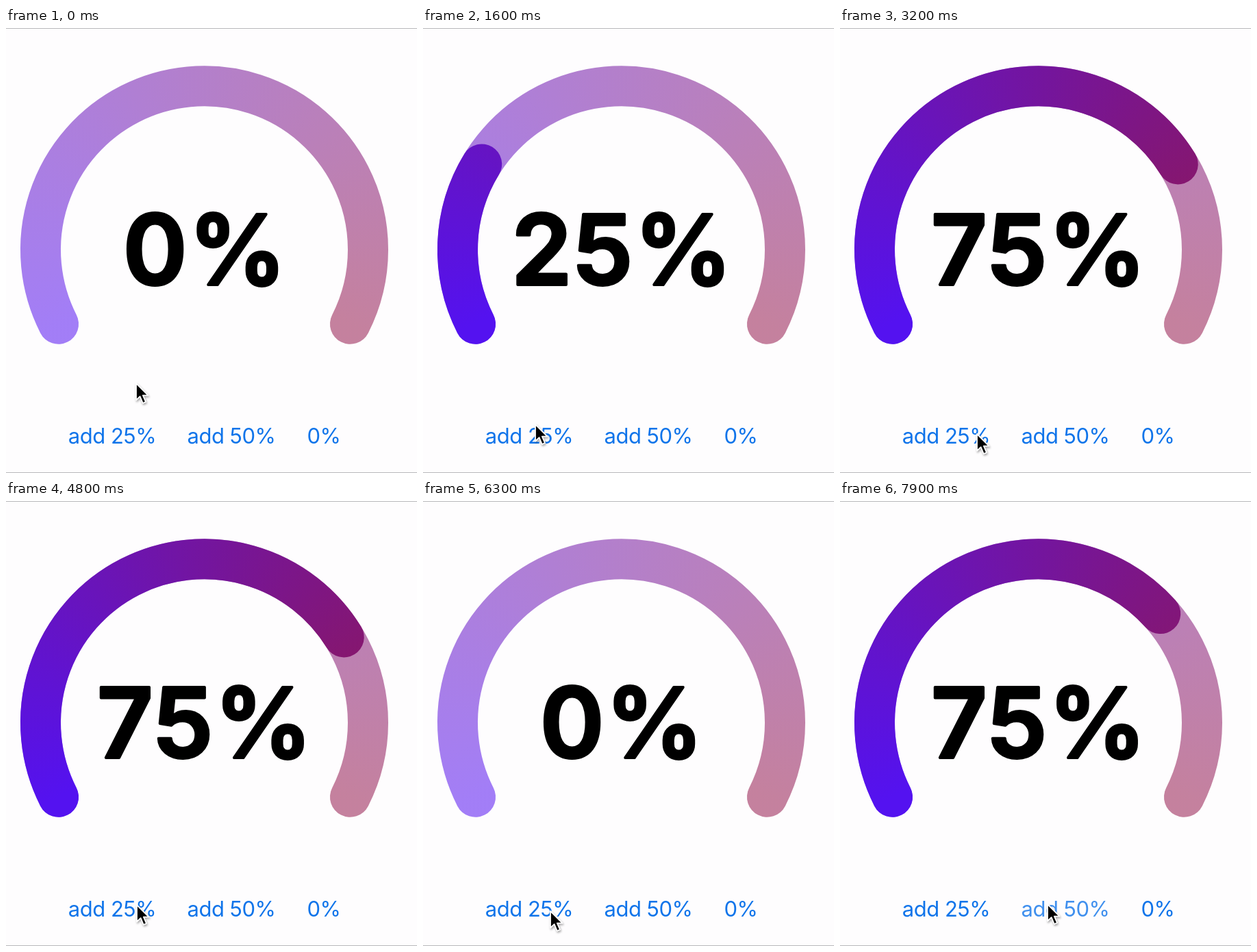
An HTML page with a canvas that plays this animation: 600 px wide and 650 px high, repeating every 8000 ms.

```html
<!DOCTYPE html>
<html lang="en">
<head>
<meta charset="utf-8">
<title>Gauge</title>
<style>
  html, body { margin: 0; width: 100%; height: 100%; overflow: hidden; background: #fefdfe; }
  canvas, svg { position: absolute; left: 0; top: 0; display: block; }
  text { font-family: Inter, "Open Sans", sans-serif; text-anchor: middle; }
  #value {
    font-size: 142px; font-weight: 600; letter-spacing: 2px;
    stroke: #000; stroke-width: 4; stroke-linejoin: round;
  }
  .button { font-size: 31px; letter-spacing: -0.5px; fill: #0f74ea; }
  #cursor { filter: drop-shadow(1px 2px 1.5px rgba(0, 0, 0, .35)); }
</style>
</head>
<body>
<canvas id="gauge" width="600" height="650"></canvas>
<svg width="600" height="650" viewBox="0 0 600 650">
  <path d="M0 .5H600M0 649.5H600" stroke="#b8b8bb"/>
  <text id="value" x="291" y="375"></text>
  <text class="button" x="155" y="607">add 25%</text>
  <text class="button" x="329" y="607">add 50%</text>
  <text class="button" x="464" y="607">0%</text>
  <path id="cursor" d="M0 0V24.5L5.6 19.2 9.8 29 14 27.2 9.9 17.7H17.5Z"
        fill="#000" stroke="#fff" stroke-width="1.8" stroke-linejoin="round"/>
</svg>
<script>
const LOOP = 8000;
const FILL_MS = 350;
const FADE_MS = 400;
const MOVE_MS = 300;
const START = 153 * Math.PI / 180;
const SWEEP = 234 * Math.PI / 180;
const CENTER = [289.5, 323.8];
const RADIUS = 239;

const [ADD_25, ADD_50, RESET] = document.querySelectorAll('.button');
const buttons = [ADD_25, ADD_50, RESET];

// where the pointer rests and when it gets there
const rests = [
  { at: 750, x: 164, y: 579 },
  { at: 2150, x: 300, y: 590 },
  { at: 3100, x: 200, y: 593 },
  { at: 4500, x: 191, y: 590 },
  { at: 5400, x: 456, y: 592 },
  { at: 6250, x: 186, y: 599 },
  { at: 6800, x: 303, y: 589 }
];

const clicks = [
  { at: 1000, button: ADD_25 },
  { at: 2250, button: ADD_50 },
  { at: 5500, button: RESET },
  { at: 6510, button: ADD_25 },
  { at: 7618, button: ADD_50 }
];

const ctx = document.getElementById('gauge').getContext('2d');
const valueText = document.getElementById('value');
const cursor = document.getElementById('cursor');

const clamp = v => Math.min(1, Math.max(0, v));
const ease = v => (1 - Math.cos(Math.PI * clamp(v))) / 2;
const mix = (a, b, k) => a + (b - a) * k;

const gradient = ctx.createConicGradient(Math.PI / 2, ...CENTER);
gradient.addColorStop(63 / 360, '#5412f0');
gradient.addColorStop(297 / 360, '#93184c');
ctx.strokeStyle = gradient;
ctx.lineWidth = 59;
ctx.lineCap = 'round';

function drawArc(fraction, alpha) {
  ctx.globalAlpha = alpha;
  ctx.beginPath();
  ctx.arc(...CENTER, RADIUS, START, START + SWEEP * fraction);
  ctx.stroke();
}

function gaugeAt(t) {
  let filled = 0, value = 0;
  for (const { at, button } of clicks) {
    if (t < at) break;
    const next = button === RESET ? 0 : value + parseInt(button.textContent.slice(4));
    filled = mix(value, next, ease((t - at) / FILL_MS));
    value = next;
  }
  return { filled, value };
}

function pointerAt(t) {
  let x = 190, y = 519;
  for (const rest of rests) {
    const k = ease((t - rest.at) / MOVE_MS + 1);
    x = mix(x, rest.x, k);
    y = mix(y, rest.y, k);
  }
  return [x, y];
}

function buttonAlpha(button, t) {
  const click = clicks.findLast(c => c.button === button && c.at - 100 < t);
  return click ? mix(.3, 1, clamp((t - click.at) / FADE_MS)) : 1;
}

function render(t) {
  const { filled, value } = gaugeAt(t);
  ctx.clearRect(0, 0, 600, 650);
  drawArc(1, .54);
  if (filled > 0.05) drawArc(filled / 100, 1);

  valueText.textContent = value + '%';
  for (const button of buttons) button.setAttribute('opacity', buttonAlpha(button, t));
  cursor.setAttribute('transform', `translate(${pointerAt(t)})`);
}

const began = performance.now();
function tick() {
  render((performance.now() - began) % LOOP);
  requestAnimationFrame(tick);
}
tick();
</script>
</body>
</html>
```
